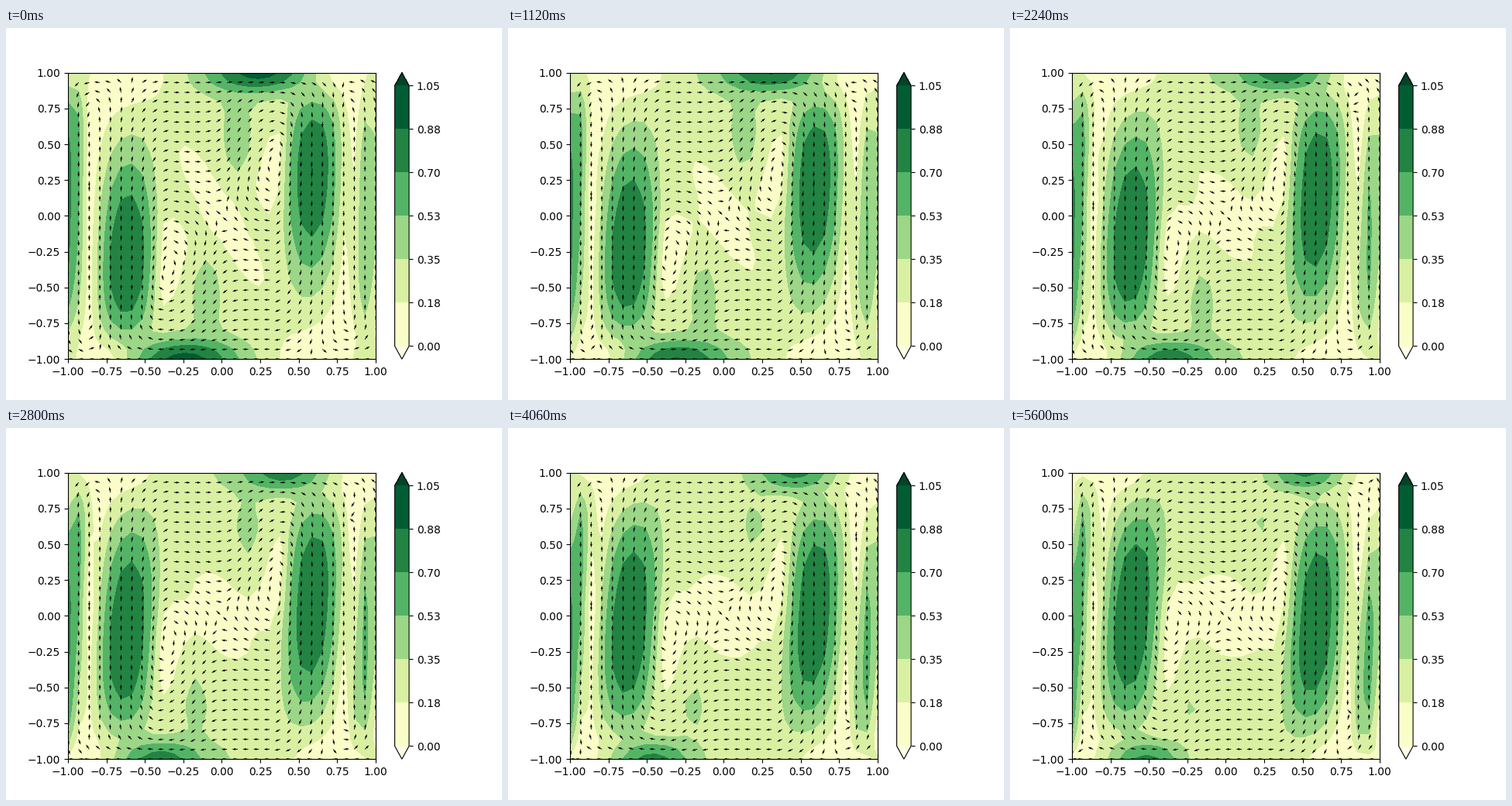
A matplotlib script for the animation above (5740 ms loop, 640 by 480 pixels).

```python
import numpy as np
import matplotlib.pyplot as plt
from matplotlib.animation import FuncAnimation

FRAMES, INTERVAL = 41, 140
STEPS = 30
LEVELS = np.linspace(0, 1.05, 7)

axis = np.linspace(-1, 1, 30)
X, Y = np.meshgrid(axis, axis)


def mix(a, b, e):
    return a + (b - a) * e


def bump(z, width):
    return np.exp(-(z / width) ** 2)


def arch(y, shift, power):
    """Profile that is 1 near y = shift and 0 at both walls."""
    eta = y - shift * (1 - y ** 2)
    return 1 - np.abs(eta) ** power


def ridge(distance, half):
    """Cosine ridge that stays at zero beyond its half width."""
    return np.cos(np.clip(distance / half, -1, 1) * np.pi / 2)


def wall_drift(x, e):
    """Gentle flow along the top wall, reversed near the corners."""
    drift = mix(.25, .21, e) * np.cos(np.pi / 2 * x / mix(.57, .72, e))
    return drift - .18 * e * np.sin(4.5 * x) * bump(x, .9)


def wall_jet(x, e):
    """Fast stream on the top wall that slides right and weakens."""
    return mix(.78, .76, e) * bump(x - mix(.28, .51, e), mix(.39, .29, e))


def horizontal(x, y, e):
    xi = y - mix(1.1, .1, e) * x
    u = (.2 + .06 * e + mix(.1, .06, e) * y ** 2) * np.tanh(xi / mix(.2, .34, e))
    u *= 1 - .4 * (1 - .6 * e) * bump(x + .5 * y, .12) * bump(y, .65)
    for sign in (1, -1):
        leg = bump(sign * x - .36, .07) * np.exp(-((sign * y - .3) / .25) ** 4)
        u *= 1 - .6 * leg
    u *= np.exp(-(x / .6) ** 6)
    # The bottom wall is the top wall turned by half a circle.
    for sign in (1, -1):
        depth = 1 - sign * y
        u += bump(depth, .2) * (sign * wall_drift(sign * x, e) - u)
        u += bump(depth, .14) * sign * wall_jet(sign * x, e)
    return u


def updraft(x, y, e):
    rise = bump(y - mix(.5, .75, e), mix(.6, .5, e)) * (1 - y ** 8)
    return mix(.36, .25, e) * bump(x - mix(.1, .22, e), mix(.17, .14, e)) * rise


def vertical(x, y, e):
    tilt = mix(.02, .06, e) * y
    left = -.612 + tilt - x
    right = x - .587 - tilt
    v = .885 * arch(y, -.35 * (1 - e), 2.2) * ridge(left, .256)
    v -= .875 * arch(y, .35 - .4 * e, 2.2) * ridge(right, .247)

    # Return flow along the side walls.
    edge = np.clip((-.9 - x) / .1, 0, 1)
    out_left = np.clip(left - .253, 0, None)
    out_right = np.clip(right - .245, 0, None)
    v -= .75 * np.sin(11.8 * out_left) * arch(y, .15 - .6 * e * edge, 4)
    v += mix(.52, .62, e) * np.sin(14 * out_right) * arch(y, -.33 * e, 3)

    v += updraft(x, y, e) - updraft(-x, -y, e)
    v += .1 * e * np.sin(np.pi * np.clip(x / .36, -1, 1)) * bump(y, .5)
    return v


def velocity(frame):
    step = (3 * frame + 1) // 4  # every fourth frame holds
    s = step / STEPS
    e = s * (1.4 - .4 * s)
    return horizontal(X, Y, e), vertical(X, Y, e)


def draw(frame):
    u, v = velocity(frame)
    speed = np.hypot(u, v)
    norm = np.maximum(speed, 1e-9)
    ax.clear()
    filled = ax.contourf(X, Y, speed, levels=LEVELS, cmap="YlGn", extend="both")
    ax.quiver(X, Y, u / norm, v / norm)
    ax.set(xlim=(-1, 1), ylim=(-1, 1))
    return filled


fig, ax = plt.subplots(figsize=(6.4, 4.8), dpi=100)
bar = fig.colorbar(draw(0), ax=ax, ticks=LEVELS)
bar.set_ticklabels([f"{level + 1e-9:.2f}" for level in LEVELS])

anim = FuncAnimation(fig, draw, frames=FRAMES, interval=INTERVAL,
                     init_func=lambda: None, repeat=True, repeat_delay=0)
plt.show()
```
